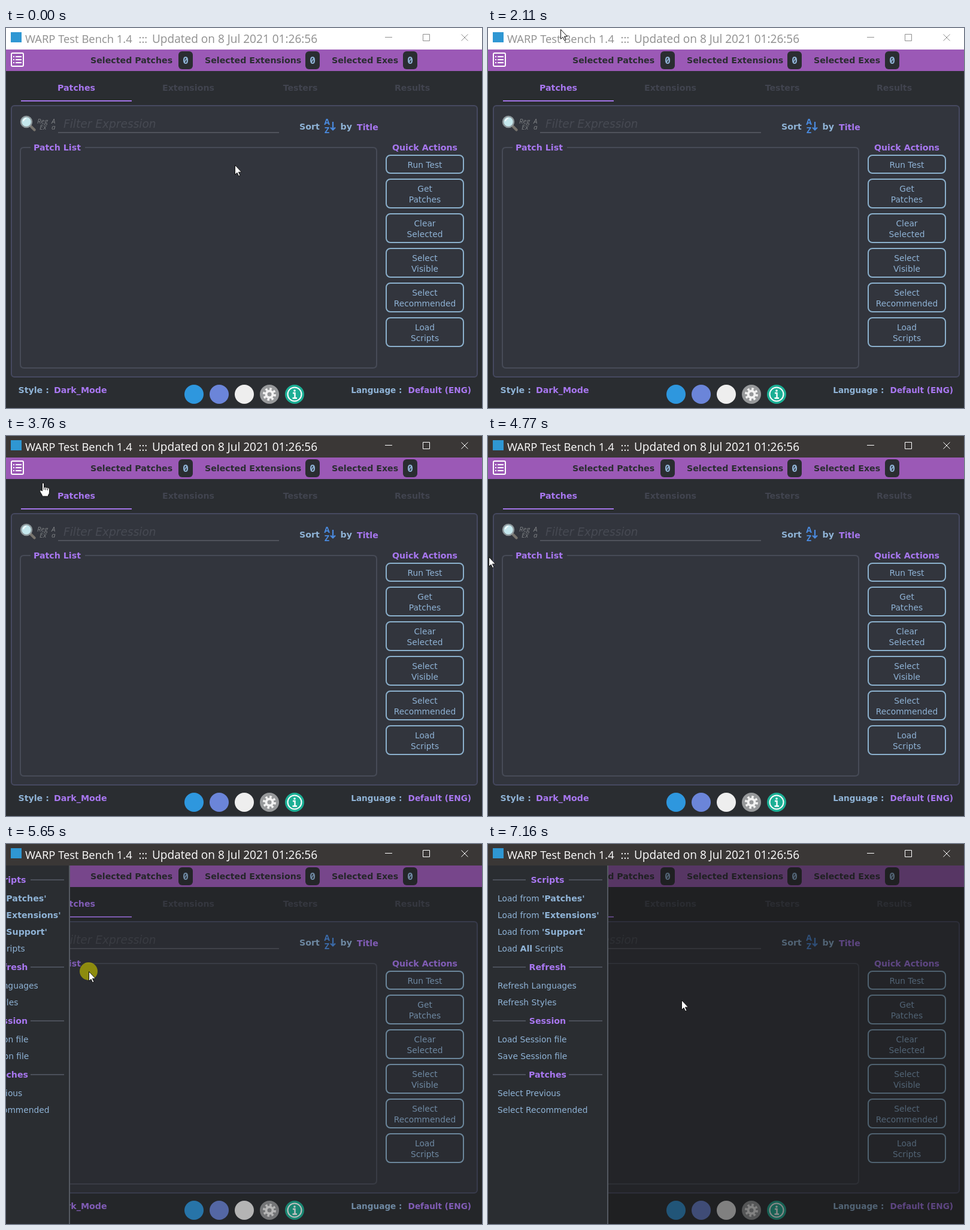
An HTML page for the animation above (8 s loop, 795 by 636 pixels).

```html
<!DOCTYPE html>
<html lang="en">
<head>
<meta charset="utf-8">
<title>Test Bench</title>
<style>
  html, body { margin: 0; width: 100%; height: 100%; overflow: hidden; background: #2a2d31; }
  svg { display: block; width: 795px; height: 636px; }
  text { font: 13.8px "DejaVu Sans", sans-serif; fill: #8fb3d6; white-space: pre; }
  .b { font-weight: 700; font-size: 14.2px; }
  .hi { fill: #a877f0; }
  .dark { fill: #2a2d31; }
  .off { fill: #41444f; }
  .mid { text-anchor: middle; }
  .end { text-anchor: end; font-size: 13.6px; }
  .zero { font: 700 16px "Noto Sans Mono", monospace; }
  .hint { font-size: 18.6px; font-style: italic; fill: #474a53; }
  .tiny { font: italic 11.5px "Open Sans", sans-serif; fill: #7e8184; }
  .az { font: 700 14px "Open Sans", sans-serif; fill: #4a8be0; }
  .cap { font: 18.4px "Open Sans", sans-serif; fill: inherit; }
  .cap.date { font-size: 19.05px; }
</style>
</head>
<body>
<svg id="stage" viewBox="0 0 795 636"></svg>
<script>
const stage = document.getElementById('stage');

const text = (x, y, cls, s) => `<text x="${x}" y="${y}" class="${cls}">${s}</text>`;
const rect = (x, y, w, h, attrs) => `<rect x="${x}" y="${y}" width="${w}" height="${h}" ${attrs}/>`;
const path = (d, attrs) => `<path d="${d}" ${attrs}/>`;
const disc = (x, y, r, attrs) => `<circle cx="${x}" cy="${y}" r="${r}" ${attrs}/>`;
const line = (color, w = 2) => `fill="none" stroke="${color}" stroke-width="${w}"`;

function titleBar() {
  return `<g id="bar">` + rect(0, 0, 795, 36, 'id="barBg"')
    + rect(8, 7, 18, 17, 'fill="#2f97d3"')
    + text(32, 25, 'cap', 'WARP Test Bench 1.4')
    + text(221.5, 25, 'cap', ':::')
    + text(244, 25, 'cap date', 'Updated on 8 Jul 2021 01:26:56')
    + path('M633 15.5h12M696.5 10.5h11v11h-11zM760.5 10.5l11 11M771.5 10.5l-11 11',
        'id="barKeys" fill="none" stroke-width="1"')
    + '</g>';
}

function header() {
  const counts = [['Patches', 141, 288], ['Extensions', 332, 500], ['Exes', 544, 663]];
  return rect(0, 36, 795, 36, 'fill="#9b59b6"')
    + rect(9, 42, 20, 22, 'rx="2" ' + line('#fff'))
    + path('M12 48h2M12 53h2M12 58h2M16 48h10M16 53h10M16 58h10', line('#fff'))
    + counts.map(([name, x, badge]) =>
        text(x, 59, 'b dark', 'Selected ' + name)
        + rect(badge, 39, 24, 30, 'rx="6" fill="#2a2d31"')
        + text(badge + 12, 60, 'zero mid', '0')).join('');
}

function tabs() {
  return ['Patches', 'Extensions', 'Testers', 'Results'].map((s, i) =>
      text(117.5 + 187 * i, 105, 'b mid ' + (i ? 'off' : 'hi'), s)).join('')
    + rect(25, 121, 185, 2, 'fill="#a375e8"');
}

function filterRow() {
  return path('M41 164l6.5 6.5', 'stroke="#77736d" stroke-width="4.5" stroke-linecap="round"')
    + disc(34, 157, 9, 'fill="#c5e8ee" stroke="#8e989c" stroke-width="2.5"')
    + path('M29 156q1-4 5-5', line('#fff', 1.8))
    + text(52, 160, 'tiny', 'Reg') + text(56, 170, 'tiny', 'Ex')
    + text(76, 160, 'tiny', 'A') + text(76, 170, 'tiny', 'a')
    + text(96, 167, 'hint', 'Filter Expression')
    + rect(87, 174, 369, 2, 'fill="#50535c"')
    + text(490, 170, 'b', 'Sort')
    + text(536, 162, 'az mid', 'A') + text(536, 176, 'az mid', 'Z')
    + path('M546 157v13M542 166.5l4 4 4-4', line('#4a8be0', 2.2))
    + text(558.5, 170, 'b', 'by') + text(586, 171, 'b hi', 'Title');
}

function button(label, i) {
  const rows = label.split('|'), y = i ? 194 + 58 * i : 212;
  return rect(635, y + 1, 129, rows.length * 18 + 12, 'rx="7" ' + line('#8bb0cc'))
    + rows.map((s, k) => text(699.5, y + 22 + 18 * k, 'mid', s)).join('');
}

function panel() {
  const labels = ['Run Test', 'Get|Patches', 'Clear|Selected', 'Select|Visible',
    'Select|Recommended', 'Load|Scripts'];
  return rect(9, 130, 778, 454, 'rx="5" fill="#32353d" stroke="#464960" stroke-width="2"')
    + filterRow()
    + path('M41 200H30q-6 0-6 6V563q0 6 6 6H613q6 0 6-6V206q0-6-6-6H132', line('#474b57'))
    + text(46, 205, 'b hi', 'Patch List')
    + text(699.5, 205, 'b hi mid', 'Quick Actions')
    + labels.map(button).join('');
}

function footer() {
  const fills = ['#2e97de', '#6b85d9', '#eeeeee', '#97999b', '#1caf95'];
  return text(20.5, 611, 'b', 'Style :') + text(80, 611, 'b hi', 'Dark_Mode')
    + text(661.5, 611, 'b end', 'Language :') + text(777, 611, 'b hi end', 'Default (ENG)')
    + fills.map((f, i) => disc(314 + 42 * i, 613, 16, `fill="${f}"`)).join('')
    + disc(440, 613, 7.5, 'fill="#f2f2f2"')
    + disc(440, 613, 9, line('#f2f2f2', 4) + ' stroke-dasharray="3.534"')
    + disc(440, 613, 3.5, 'fill="#97999b"')
    + disc(482, 613, 11.5, line('#fff', 2))
    + disc(482, 607, 1.8, 'fill="#fff"')
    + path('M479 611h3.5v8M478.5 619.5h7.5', line('#fff', 2.4));
}

function drawer() {
  const bold = s => `<tspan class="b">${s}</tspan>`;
  const groups = [
    [60, 'Scripts', ...['Patches', 'Extensions', 'Support'].map(s => 'Load from ' + bold(`'${s}'`)),
      `Load ${bold('All')} Scripts`],
    [206, 'Refresh', 'Refresh Languages', 'Refresh Styles'],
    [296, 'Session', 'Load Session file', 'Save Session file'],
    [386, 'Patches', 'Select Previous', 'Select Recommended']
  ];
  return '<g id="drawer">' + rect(0, 36, 200, 600, 'fill="#2a2d31"')
    + rect(199, 36, 2, 600, 'fill="#545961"')
    + groups.map(([y, name, ...items]) =>
        path(`M8 ${y}H63M135 ${y}H191`, line('#4b505a'))
        + text(99.5, y + 5, 'b hi mid', name)
        + items.map((s, i) => text(16, y + 36 + 28 * i, '', s)).join('')).join('')
    + '</g>';
}

function pointers() {
  const ink = 'fill="#fff" stroke="#111" stroke-width="1" stroke-linejoin="round"';
  return disc(0, 0, 15, 'id="press" fill="rgba(180,176,0,.72)"')
    + '<g id="arrow">' + path('M.5 .5V16.5L4 13.2 6.6 18.8 9 17.7 6.4 12.2H11.5Z', ink) + '</g>'
    + '<g id="hand">' + path('M-1.5 14V2q0-1.5 1.5-1.5T1.5 2V8q1.5-1.2 3 .3 1.5-1 3 .5 3-.6 3 2.2V16'
        + 'q0 3-2 5V23H-1.5V21.5L-5 15.5q-1-3 1-3Z', ink)
      + path('M1.5 8v4M4.5 9v3.5M7.5 9.5V13', line('#111', 1)) + '</g>'
    + '<g id="beam">' + path('M-3.5 -7.5H-.8M.8 -7.5H3.5M0 -7V7M-3.5 7.5H-.8M.8 7.5H3.5', line('#d8d8d8', 1.2)) + '</g>';
}

stage.innerHTML = rect(0, 0, 795, 636, 'fill="#2a2d31"') + header() + tabs() + panel() + footer()
  + rect(0, 36, 795, 600, 'id="dim" fill="#141414"') + drawer() + titleBar() + pointers();

const el = id => document.getElementById(id);
const kinds = ['arrow', 'hand', 'beam'];
const [bar, barBg, barKeys, dim, menu, press] =
  ['bar', 'barBg', 'barKeys', 'dim', 'drawer', 'press'].map(el);

// Pointer runs: start time, kind, pressed, then x,y pairs about 126 ms apart.
const runs = [
  [0, 0, 0, 382, 229],
  [750, 0, 0, 376, 225, 346, 208, 302, 187],
  [1120, 2, 0, 256, 168, 215, 157, 186, 150],
  [1490, 0, 0, 162, 139, 159, 131, 148, 98, 133, 48, 121, 2, 117, 14],
  [2370, 0, 1, 115, 24, 115, 24],
  [2620, 0, 0, 111, 30, 88, 60],
  [2870, 1, 0, 62, 100],
  [3010, 0, 0, 50, 125],
  [3260, 1, 0, 52, 119, 54, 111, 56, 100, 59, 87, 62, 78],
  [3880, 0, 0, 38, 135, 6, 198, 1, 201, 0, 203],
  [4770, 0, 0, 1, 202, 2, 201, 3, 200],
  [5270, 0, 1, 11, 204, 37, 209, 86, 211, 138, 213, 191, 214, 244, 215, 304, 219, 315, 219],
  [6530, 0, 0, 315, 221, 317, 229, 319, 239, 321, 249, 322, 257, 323, 261]
];
const steps = runs.flatMap(([t, kind, down, ...p]) =>
  Array.from({ length: p.length / 2 }, (_, i) =>
    ({ t: Math.floor((t + 126 * i) / 10) * 10, kind, down, x: p[2 * i], y: p[2 * i + 1] })));

function draw(t) {
  const s = steps.findLast(k => k.t <= t);
  const place = `translate(${s.x} ${s.y})`;
  kinds.forEach((id, i) => {
    el(id).setAttribute('transform', place);
    el(id).style.display = i === s.kind ? '' : 'none';
  });
  press.setAttribute('transform', place);
  press.style.display = s.down ? '' : 'none';

  // The drawer follows the drag after a short threshold.
  const open = t < 5270 ? 0 : Math.max(0, Math.min(200, s.x - 32));
  menu.setAttribute('transform', `translate(${open - 200} 0)`);
  menu.style.display = open ? '' : 'none';
  dim.setAttribute('opacity', open / 400);

  const active = t >= 2370;
  bar.setAttribute('fill', active ? '#fff' : '#8f8f8f');
  barBg.setAttribute('fill', active ? '#3a3736' : '#fff');
  barKeys.setAttribute('stroke', active ? '#fff' : '#8f8f8f');
}

const start = performance.now();
function tick() {
  draw((performance.now() - start) % 8000);
  requestAnimationFrame(tick);
}
tick();
</script>
</body>
</html>
```
